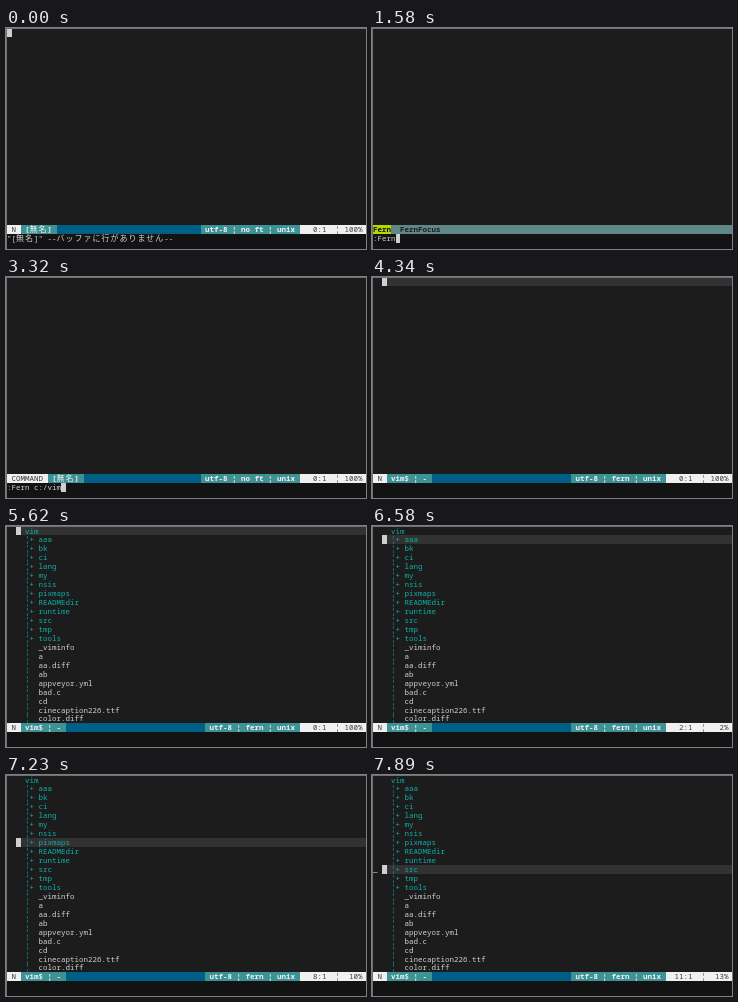
An HTML page for the animation above (8 s loop, 360 by 221 pixels).

```html
<!DOCTYPE html>
<html lang="ja">
<head>
<meta charset="utf-8">
<title>Fern in Vim</title>
<style>
  html, body { margin: 0; width: 100%; height: 100%; overflow: hidden; background: #1c1c1c; }
  #stage {
    position: relative; width: 360px; height: 221px; overflow: hidden;
    font: 7.5px/9.95px "Noto Sans Mono", "DejaVu Sans Mono", "Noto Sans CJK JP", monospace;
    color: #d0d0d0; white-space: pre;
  }
  #stage > *, .row { position: absolute; }
  .row { left: 1px; width: 360px; height: 8.95px; }
  .row span { position: absolute; top: 0; height: 100%; }
  .wide { font: 8px/0 "Noto Sans CJK JP", "Noto Sans CJK", sans-serif; letter-spacing: 1px; }
  #edge { inset: 0; border: solid #707070; border-width: 1px 0 0 1px; box-sizing: border-box; }
  #foot { left: 1px; top: 206px; width: 359px; height: 15px; background: #131313; }
  #tree { left: 0; top: 0; }
  #band { left: 10px; width: 350px; height: 8.95px; background: #323232; }
  #cursor { width: 4.5px; height: 8.95px; background: #cfcfcf; }
  .dir { color: #0cb0a8; }
  .pale { background: #f0f0f0; color: #3c3c3c; }
  .teal { background: #3d9296; color: #f0f0f0; font-weight: 600; }
  .blue { background: #005f87; }
  .menu { background: #5f8787; color: #1c1c1c; font-weight: 700; }
  .pick { background: #b4d800; color: #101010; font-weight: 700; }
</style>
</head>
<body>
<div id="stage">
  <div id="foot"></div>
  <div id="band"></div>
  <div id="tree"></div>
  <div id="spin" class="row"></div>
  <div id="status" class="row"></div>
  <div id="cmd" class="row"></div>
  <div id="cursor"></div>
  <div id="edge"></div>
</div>
<script>
const LOOP = 8000, CELL = 4.5, LINE = 8.95, COLS = 80, LINES = 80;
const STATUS_ROW = 22, CMD_ROW = 23;
const $ = id => document.getElementById(id);
const rowTop = row => 0.5 + row * LINE + "px";
const isWide = ch => ch >= "\u3000";
const cells = text => [...text].reduce((n, ch) => n + (isWide(ch) ? 2 : 1), 0);
const markWide = text => text.replace(/[\u3000-\u9fff]+/g, '<b class="wide">$&</b>');

function part(col, text, style, width = cells(text)) {
  return `<span class="${style}" style="left:${col * CELL}px;width:${width * CELL}px">${markWide(text)}</span>`;
}

const dirs = "aaa bk ci lang my nsis pixmaps READMEdir runtime src tmp tools".split(" ");
const files = "_viminfo a aa.diff ab appveyor.yml bad.c cd cinecaption226.ttf color.diff".split(" ");

const treeRows = [
  part(4, "vim", "dir"),
  ...dirs.map(name => part(4, "¦+ " + name, "dir")),
  ...files.map(name => part(4, "¦", "dir") + part(7, name, ""))
];
$("tree").innerHTML = treeRows
  .map((html, row) => `<div class="row" style="top:${rowTop(row)}">${html}</div>`).join("");

function statusLine(s) {
  if (s.menu) return part(0, "", "menu", COLS) + part(0, "Fern", "pick") + part(6, "FernFocus", "menu");
  const mode = ` ${s.mode} `;
  const name = s.fern ? " vim$ ¦ - " : " [無名] ";
  const info = ` utf-8 ¦ ${s.fern ? "fern" : "no ft"} ¦ unix `;
  const percent = s.line ? Math.floor(s.line * 100 / LINES) : 100;
  const pos = `${s.line}:1`.padStart(6) + "  ¦ " + `${percent}% `.padStart(5);
  const right = COLS - pos.length;
  return part(0, "", "blue", COLS) + part(0, mode, "pale") + part(mode.length, name, "teal") +
    part(right - info.length, info, "teal") + part(right, pos, "pale");
}

// Each step holds only what changes at that time.
const type = (t, cmd, more) => ({ t, cmd, cursor: [cells(cmd), CMD_ROW], ...more });
const move = (t, line) => ({ t, line, cursor: [2, line - 1], band: line - 1 });
const spin = (start, times, marks) => times.map((t, i) => ({ t: start + t, spin: marks[i] }));

const steps = [
  { t: 0, mode: "N", menu: false, fern: false, tree: false, line: 0, band: -1, spin: "",
    cursor: [0, 0], cmd: '"[無名]" --バッファに行がありません--' },
  { t: 310, cursor: null },
  { t: 560, cursor: [0, 0] },
  type(620, ":"),
  type(1010, ":F"),
  type(1330, ":Fe"),
  type(1580, ":Fern", { menu: true }),
  type(2310, ":Fern ", { menu: false, mode: "COMMAND" }),
  type(2520, ":Fern c"),
  type(2700, ":Fern c:"),
  type(2920, ":Fern c:/"),
  type(3160, ":Fern c:/v"),
  type(3240, ":Fern c:/vi"),
  type(3320, ":Fern c:/vim"),
  { t: 3620, cmd: "", mode: "N", cursor: [0, 0] },
  { t: 3680, fern: true, band: 0, cursor: [2, 0], spin: "_" },
  ...spin(3860, [0, 70], "-`"),
  ...spin(4110, [0, 60, 120, 170, 230], ["'", "´", "-", "_", ""]),
  { t: 5620, tree: true },
  move(5680, 1),
  move(6580, 2),
  move(7090, 3),
  move(7140, 5),
  move(7180, 6),
  move(7230, 8),
  move(7280, 9),
  move(7350, 11),
  ...spin(7720, [0, 60, 110, 170], "'´-_")
];

function draw(s) {
  $("status").innerHTML = statusLine(s);
  $("cmd").innerHTML = markWide(s.cmd);
  $("tree").style.visibility = s.tree ? "visible" : "hidden";
  $("spin").textContent = s.spin;
  $("spin").style.top = rowTop(Math.max(0, s.line - 1));
  $("band").hidden = s.band < 0;
  $("band").style.top = rowTop(s.band);
  $("cursor").hidden = !s.cursor;
  if (s.cursor) {
    $("cursor").style.left = 1 + s.cursor[0] * CELL + "px";
    $("cursor").style.top = rowTop(s.cursor[1]);
  }
}

$("status").style.top = rowTop(STATUS_ROW);
$("cmd").style.top = rowTop(CMD_ROW);

const start = performance.now();
let shown = 0;

function tick() {
  const t = (performance.now() - start) % LOOP;
  const past = steps.filter(step => step.t <= t);
  if (past.length !== shown) {
    shown = past.length;
    draw(Object.assign({}, ...past));
  }
  requestAnimationFrame(tick);
}
tick();
</script>
</body>
</html>
```
